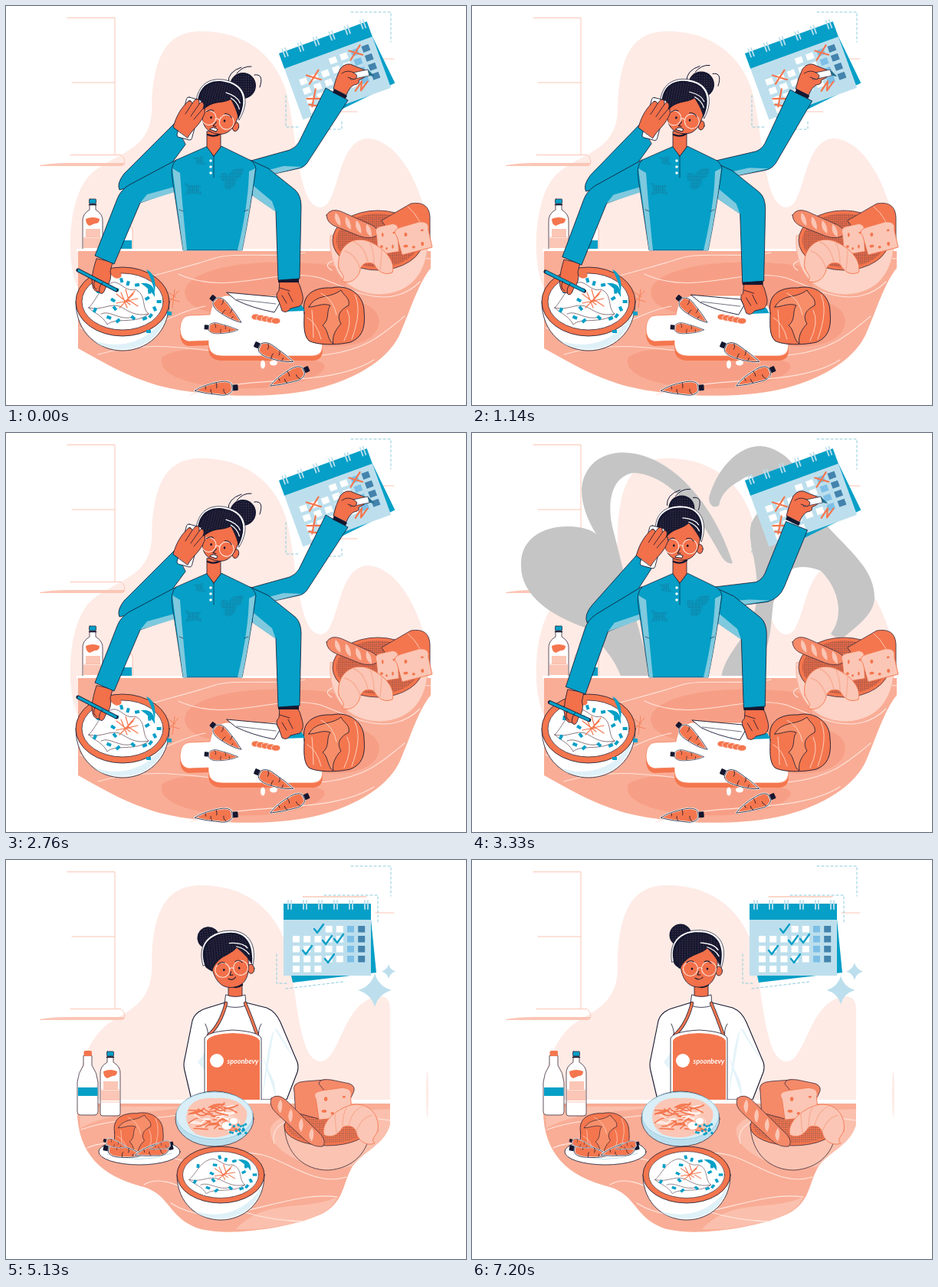
These frames come from a looping animation (600 px wide and 521 px high, 7.23 s). An HTML page:

```html
<!DOCTYPE html>
<html lang="en">
<head>
<meta charset="utf-8">
<title>Busy kitchen, calm kitchen</title>
<style>
html, body { margin: 0; width: 100%; height: 100%; overflow: hidden; background: #fff; }
svg { display: block; width: 100vw; height: 100vh; stroke-linecap: round; stroke-linejoin: round; }
</style>
</head>
<body>
<svg id="stage" viewBox="0 0 600 521"></svg>
<script>
const LOOP = 7230, SWAP = 3600, SWAY = 1377;
const TEAL = '#059fc7', SKY = '#7fc9de', PALE = '#bddfed', CORAL = '#f4764e', SKIN = '#f2704a',
  PEACH = '#f9ad96', ROSE = '#fbc6b5', BLUSH = '#feebe6', NAVY = '#15172f', WHITE = '#fff', LINE = '#3b2a3a';

const path = (d, fill = 'none', stroke = 'none', w = 1, extra = '') =>
  `<path d="${d}" fill="${fill}" stroke="${stroke}" stroke-width="${w}" ${extra}/>`;
const oval = (x, y, rx, ry, fill, stroke = 'none', w = 1) =>
  `<ellipse cx="${x}" cy="${y}" rx="${rx}" ry="${ry}" fill="${fill}" stroke="${stroke}" stroke-width="${w}"/>`;
const box = (x, y, w, h, fill, r = 0, stroke = 'none') =>
  `<rect x="${x}" y="${y}" width="${w}" height="${h}" rx="${r}" fill="${fill}" stroke="${stroke}" stroke-width=".8"/>`;
const group = (inner, transform = '', id = '') => `<g id="${id}" transform="${transform}">${inner}</g>`;
const repeat = (n, f) => Array.from({ length: n }, (_, i) => f(i)).join('');
const rand = i => { const v = Math.sin(i * 91.7 + 4.3) * 4375.85; return v - Math.floor(v); };

/* shared props */
function bottle(x, y, cap) {
  return group(
    path('M-4 7 L-4 14 Q-14 20 -13 30 L-13 81 Q-13 84 -10 84 H10 Q13 84 13 81 V30 Q14 20 4 14 V7Z', WHITE, LINE, .8) +
    path('M-9 26 Q0 22 9 26 Q9 32 3 32 L-4 35 Q-9 33 -9 26Z', CORAL) +
    box(-9, 39, 19, 11, ROSE) + box(-12, 51, 24, 13, ROSE) + path('M-12 50 H12 M-12 66 H12', 'none', PEACH, .7) +
    box(-4.5, 0, 9, 6, cap, 1, LINE) + path('M-4.5 7.5 H4.5', 'none', NAVY, 1.5), `translate(${x} ${y})`);
}

function carrot(x, y, angle, len) {
  const k = len / 45;
  return group(
    box(-5, -4, 8, 7, NAVY, 1) +
    path('M2 -4 Q6 -9 14 -8 L33 -4 L46 0 Q36 6 16 8 Q5 9 2 4Z', CORAL, WHITE, 2) +
    path('M2 -4 Q6 -9 14 -8 L33 -4 L46 0 Q36 6 16 8 Q5 9 2 4Z M10 -7 Q13 -4 12 -1 M20 7 Q19 3 20 1 M26 -5 Q28 -3 27 0 M33 4 L33 1', 'none', NAVY, .7),
    `translate(${x} ${y}) rotate(${angle}) scale(${k})`);
}

function soup(x, y, rx, ry, depth) {
  const bits = repeat(17, i => {
    const a = i * 2.4, r = .3 + .65 * Math.sqrt(rand(i));
    return group(box(-3, -2, 6, 4, TEAL), `translate(${46 * r * Math.cos(a) + 4} ${31 * r * Math.sin(a)}) rotate(${i * 53})`);
  });
  const inside = oval(0, 0, 53, 37, WHITE, LINE, .8) +
    path('M-44 8 C-34 -2 -30 -18 -16 -24 C-4 -30 2 -12 16 -16 C32 -10 24 8 34 16 C18 30 -10 20 -20 30 C-26 18 -36 16 -44 8Z', WHITE, '#59414c', .7) +
    path('M-44 8 C-26 12 -18 2 -4 6 C8 12 16 20 34 16 M-28 16 C-16 10 -4 26 14 20', 'none', '#59414c', .7) + bits +
    path('M-8 -10 L10 4 M-2 -12 L6 8 M16 -14 L2 2 M-8 2 L20 -4 M4 -16 L8 -2 L20 6 M-4 8 L6 -2 L14 -10', 'none', CORAL, 1.2) +
    path('M24 -24 Q43 -26 42 -6 Q38 -14 24 -24Z', TEAL);
  return group(
    path(`M${-rx} 0 C${-rx} ${depth * .65} ${-rx * .5} ${depth} 0 ${depth} C${rx * .5} ${depth} ${rx} ${depth * .65} ${rx} 0Z`, WHITE, NAVY, .8) +
    path(`M${rx * .96} 14 C${rx * .85} ${depth * .65} ${rx * .5} ${depth * .97} 0 ${depth * .97} C${-rx * .3} ${depth * .97} ${-rx * .5} ${depth * .9} ${-rx * .6} ${depth * .8} C0 ${depth} ${rx * .6} ${depth * .8} ${rx * .96} 14Z`, '#dff1f8') +
    oval(0, 0, rx, ry, CORAL, NAVY, .8) + group(inside, `scale(${rx / 61} ${ry / 45})`), `translate(${x} ${y})`);
}

const croissant = transform => group(
  path('M0 38 C-4 10 20 -8 45 6 C62 15 74 30 70 44 C60 48 52 44 46 33 C38 29 30 32 28 40 C26 52 14 60 4 55 C10 50 3 46 0 38Z', ROSE, CORAL, .9) +
  path('M8 16 Q22 20 28 39 M20 4 Q34 10 38 31 M40 4 Q46 14 46 33 M56 13 Q56 22 54 40', 'none', PEACH, 1.4), transform);

const slice = transform => group(
  path('M2 12 Q-4 2 10 0 L34 -4 Q48 -3 44 10 L46 36 L6 41Z', ROSE, CORAL, .9) +
  oval(14, 12, 2, 3, CORAL) + oval(12, 29, 3, 2, CORAL) + oval(22, 32, 2, 2, CORAL) + oval(34, 29, 2, 3, CORAL) + oval(36, 9, 2, 1.5, CORAL), transform);

const baguette = (transform, len) => group(
  path(`M0 0 Q2 -11 16 -11 L${len - 12} -8 Q${len} -6 ${len} 2 Q${len - 8} 11 ${len - 22} 11 L18 10 Q4 10 0 0Z`, '#f58a69', LINE, .7) +
  repeat(4, i => path(`M${10 + i * len / 5} -7 q9 3 12 14 q-11 -2 -12 -14`, ROSE)), transform);

const cabbage = transform => group(
  path('M2 34 C-2 10 14 0 38 1 C60 -4 80 10 80 32 C82 52 78 66 62 72 C46 76 18 76 8 70 C0 62 2 46 2 34Z', CORAL, NAVY, .9) +
  path('M8 26 C18 8 34 16 50 4 C54 12 62 14 60 24 C48 30 44 38 50 48 C42 56 38 66 40 74 C32 70 34 56 26 50 C36 42 30 32 36 24 C26 20 18 26 8 26Z', '#f78e69', NAVY, .8) +
  path('M6 40 Q18 46 24 68 M12 30 Q14 50 14 66 M68 10 Q78 30 64 68 M58 30 Q66 46 54 70 M24 8 Q40 16 44 36', 'none', '#ffd8cb', .9), transform);

const cells = repeat(35, i => {
  const c = i % 7, r = i / 7 | 0;
  if ((r === 0 && c < 3) || (r === 4 && c > 2)) return '';
  return box(12 + c * 14.2, 29 + r * 13, 9, 8.5, c === 5 ? '#7dbfe6' : c === 6 ? '#4383ad' : WHITE);
});
const calendar = (w, h, marks, transform) => group(
  path(`M10 ${h} L12 ${h + 9} L${w + 7} ${h - 4} L${w} 20Z`, TEAL) + box(0, 0, w, h, PALE) + box(0, 0, w, 21, TEAL) +
  group(cells, `scale(${w / 114} ${h / 94})`) +
  repeat(6, i => path(`M${6 + i * (w - 14) / 5} 7 v-11 m4 0 v11`, 'none', PALE, 1.8)) + marks, transform);

const cap = path('M-31 12 C-36 -28 -10 -33 1 -33 C26 -33 38 -12 29 20 Q16 -6 2 0 Z', WHITE, NAVY, .7);
const hair = path('M-29 10 C-34 -24 -10 -31 1 -30 C22 -31 34 -14 28 18 C24 10 20 2 12 -7 C2 4 -12 0 -21 22 C-25 18 -29 16 -29 10Z', NAVY) +
  path('M-27 8 C-30 -20 -10 -29 1 -28 C20 -29 30 -14 26 12 Q20 0 12 -8 C2 2 -12 -2 -21 20Z', 'url(#dots)') +
  path('M12 -9 Q22 -5 26 4 M4 -15 Q20 -14 25 -5', 'none', WHITE, 1.3);
const glasses = path('M-1 30 Q2 27 5 30', 'none', '#ffe4da', 1.1) +
  oval(-10, 30, 9.5, 9.5, 'none', '#ffe4da', 1.1) + oval(14, 30, 9.5, 9.5, 'none', '#ffe4da', 1.1);
const face = path('M-22 6 C-20 -18 20 -20 27 6 C28 34 21 48 3 48 C-18 48 -22 26 -22 6Z', SKIN, NAVY, .8);

/* backdrops */
const crown = 'C192 80 202 34 252 33 C305 32 348 58 365 110 C380 165 380 262 410 263';
const blobBusy = path(`M96 372 C78 345 78 256 108 222 C140 190 192 192 190 130 ${crown} C436 262 430 174 472 173 C516 175 552 250 554 320 V345Z`, BLUSH);
const blobCalm = path(`M97 345 C86 290 100 244 130 216 C162 194 193 188 190 130 ${crown} C438 262 438 180 490 178 Q501 180 501 195 V330Z`, BLUSH) + oval(549.5, 306, 1.5, 30, BLUSH);
const room = path('M80 15.5 H142 V194 M86 100 H142 M84 194.5 H150 Q157 200 154 207', 'none', '#fcc5b6', 1) +
  path('M44 208 Q60 205 80 205 H155 Q154 209 150 209 H44Z', '#fbc6b6') +
  path('M450 8 H502 V47', 'none', '#8bcbdc', 1, 'stroke-dasharray="3 3"') + path('M482 69 H506', 'none', '#fcc5b6', 1);

/* busy scene */
const marksBusy = path('M24 39 l16 12 m-16 0 l17 -13 M87 28 l15 11 m-17 1 l18 -14 M17 80 l12 -20 m-15 8 l17 6 M14 76 l14 8 M77 80 l12 -9 l-5 11 l12 -8', 'none', CORAL, 2.2);
const grain = 'M96 386 C150 360 225 345 270 330 C300 320 350 330 390 322 M225 350 C290 380 350 340 410 355 C450 370 500 400 540 360 M120 455 C220 425 300 470 420 455 C470 448 490 430 520 405 M240 508 C310 480 420 500 480 462 M96 420 C160 450 210 400 260 392 M425 345 C400 330 460 322 554 330';
const tableBusy = box(92, 317, 464, 4, WHITE) +
  path('M94 320 H554 V342 C537 364 528 396 514 428 C496 468 440 494 390 503 C340 512 260 511 200 496 C155 483 125 464 94 447Z', PEACH) +
  path('M236 364 C262 334 350 330 420 338 C460 345 425 375 470 390 C500 404 490 440 440 444 C360 450 330 400 280 402 C252 400 224 386 236 364Z M204 458 C250 432 300 470 390 462 C440 462 410 490 360 496 C300 506 190 494 204 458Z', '#f79f86') +
  path(grain, 'none', '#ffe3da', 1.1);

const board = 'M285 378 H366 Q380 380 386 392 L412 437 Q416 456 400 457 H282 Q265 457 264 442 V437 L238 438 Q227 436 227 421 Q228 404 240 404 L266 403 Q268 384 285 378Z';
const breadBusy = path('M423 300 C420 345 445 376 487 377 C530 376 552 345 550 302Z', '#fcd3c6', PEACH, .9) +
  group(oval(0, 0, 59, 39, CORAL, LINE, .8) + oval(0, 0, 54, 35, '#e76a46') + oval(0, 0, 54, 35, 'url(#specks)'), 'translate(485 306)') +
  path('M490 280 L528 258 Q552 254 553 276 V308 L520 322Z', CORAL, LINE, .8) + path('M524 262 Q542 276 547 305', 'none', ROSE, 1) +
  baguette('translate(418 273) rotate(20)', 72) + slice('translate(482 288) scale(.66 .9)') +
  slice('translate(506 290) rotate(-8) scale(1 .88)') + croissant('translate(434 304)');

const strands = path('M-19 -4 Q-20 -18 -2 -24 M-8 -16 Q0 -26 11 -25 M15 -14 Q28 -16 22 2', 'none', NAVY, 1);
const headBusy = group(
  oval(27, 33, 4, 6, SKIN, NAVY, .8) + group(cap, 'translate(0 6) scale(1 .88)') + face +
  group(hair, 'translate(0 6) scale(1 .88)') + glasses +
  path('M-15 23 q5 -5 9 -3 M9 20 q6 -2 10 3 M1 33 l-3 6 h4', 'none', NAVY, 1) +
  oval(-7, 29, 1.3, 1.6, NAVY) + oval(11, 29, 1.3, 1.6, NAVY) +
  path('M-5 44 Q-2 39 5 42 L4 45Z', WHITE, NAVY, .9), 'translate(270 118)');

const phoneHand = group(
  group(box(-10, -27, 20, 54, WHITE, 3, NAVY) + box(-7, -23, 4, 7, NAVY, 1.5), 'rotate(15)') +
  path('M-21 11 C-16 -6 -10 -14 -2 -22 Q2 -25 4 -20 L8 -25 Q14 -27 13 -19 L16 -22 Q21 -20 18 -13 L20 -13 Q22 -8 18 -2 C12 10 4 14 -2 25Z', SKIN, NAVY, .8) +
  path('M4 -20 L-5 -6 M13 -19 L2 -3 M18 -13 L6 1', 'none', NAVY, .8), 'translate(239 147)');
const writeHand = path('M427 108 Q430 94 436 82 Q444 72 454 78 L469 84 Q473 90 466 94 L460 97 Q462 102 454 103 Q448 106 444 116Z', SKIN, NAVY, .8) +
  path('M448 88 L472 83 L474 91 L450 96Z', WHITE, NAVY, .7) + path('M472 83 L481 92 L474 91Z', '#236f8d') +
  path('M438 88 Q446 82 455 88 Q461 92 454 96 L446 93', SKIN, NAVY, .8) + path('M428 108 L445 117 L443 121 L426 113Z', NAVY);
const stirArm = path('M118 330 Q113 345 112 357 Q112 374 121 373 Q126 380 130 368 Q139 358 136 346 L139 335Z', SKIN, NAVY, .8) +
  path('M94 345 L144 371', 'none', NAVY, 5) + path('M95 345.5 L143 370.5', 'none', TEAL, 3.6) +
  path('M116 358 Q112 367 118 370 M126 361 Q120 368 122 373', 'none', NAVY, .8) +
  path('M222 201 L160 234 Q149 241 145 252 L116 326 L141 337 L175 257 L220 241Z', TEAL, NAVY, .8) + path('M175 257 L184 246 L220 236 V243Z', SKY);
const cutArm = path('M288 374 L353 380 L357 388 L350 400 Q320 394 300 384Z', WHITE, NAVY, .9) + path('M301 383 L352 389', 'none', NAVY, .6) +
  path('M362 391 L386 391 L390 398 L364 399Z', TEAL) +
  path('M357 358 L356 372 Q350 376 356 386 L360 398 Q366 402 371 395 L383 392 Q390 386 386 374 Q384 364 379 357Z', SKIN, NAVY, .8) +
  path('M360 378 L366 388 M368 374 L374 386 M357 368 L370 372', 'none', NAVY, .8) + path('M355 355 H382 V361 H355Z', NAVY) +
  path('M318 201 L342 212 L377 240 Q385 247 385 262 L383 356 L355 358 L352 268 L320 246Z', TEAL, NAVY, .8) + path('M322 234 L347 255 L352 269 L322 248Z', SKY);
const patches = 'M244 198 l14 -2 l-2 6 l5 5 l-15 -1 l3 -4Z M233 231 l10 3 l12 -1 l-4 6 l5 7 l-11 -1 l-11 1 l3 -7Z M280 219 q7 -4 10 2 q6 -11 20 -9 q-1 12 -10 14 q2 8 -9 14 q-9 0 -6 -10 q-7 -3 -5 -11Z';
const torso = path('M263 183 L222 201 Q214 208 217 226 L231 319 H308 Q318 270 326 212 Q324 204 318 201 L281 183 L271 196Z', TEAL, NAVY, .7) +
  path('M217 212 L231 319 H236 Q230 260 227 218Z M325 212 Q318 270 308 319 H302 Q316 260 317 216Z', SKY) + path(patches, 'url(#specks)') +
  path('M262 164 L262 184 L271 196 L280 184 V164Z', SKIN, NAVY, .8) + path('M263 168 Q272 172 280 166', 'none', NAVY, 2.4) +
  path('M271 196 V224 M226 266 l5 2 M316 266 l-5 2', 'none', NAVY, .6) + repeat(3, i => oval(267, 202 + i * 8, 1.8, 1.8, WHITE));

const busy = blobBusy + room +
  path('M365 117 V158 H383 M409 161 H438 V150', 'none', '#8bcbdc', 1, 'stroke-dasharray="3 3"') + path('M436 138 H458', 'none', '#fcc5b6', 1);
const busyFront = box(134, 288, 31, 56, WHITE, 4, PEACH) + box(145, 306, 19, 11, TEAL) + bottle(113, 252, TEAL) +
  calendar(122, 92, marksBusy, 'translate(356 62) rotate(-20)') + tableBusy + breadBusy +
  path('M209 372 l12 8 m-10 8 l14 -16 m-8 22 l3 -24 m-8 12 l14 4', 'none', CORAL, .8) + soup(152, 386, 61, 45, 64) +
  path('M136 349 q5 -7 11 -2 q5 2 3 7 q-8 5 -14 -5Z', CORAL) + path('M183 344 Q197 350 194 374 Q190 356 183 344Z', TEAL) +
  box(183, 423, 6, 4, TEAL) + box(210, 399, 6, 5, TEAL) +
  path(board, CORAL, 'none', 1, 'transform="translate(0 6)"') + path(board, WHITE, CORAL, .7) +
  repeat(5, i => oval(326 + i * 6.5, 406 + i * 1.3, 6, 4, CORAL, WHITE, .7)) +
  carrot(271, 383, 40, 46) + carrot(263, 420, 4, 39) + carrot(329, 444, 24, 49) + carrot(297, 498, 175, 50) + carrot(390, 475, 155, 49) +
  oval(335, 468, 3, 5.5, WHITE) + oval(349, 466, 5, 3.5, WHITE) + cabbage('translate(387 367)') +
  path('', TEAL, NAVY, .8, 'id="writeArm"') + path('', SKY, 'none', 1, 'id="writeShade"') + group(writeHand, '', 'writeHand') +
  path('', TEAL, NAVY, .8, 'id="phoneArm"') + group(stirArm, '', 'stirArm') + group(cutArm, '', 'cutArm') + torso +
  group(oval(0, 0, 17, 17, NAVY) + oval(0, 0, 15, 15, 'url(#dots)') + strands, '', 'bunBusy') +
  group(headBusy, '', 'headBusy') + group(phoneHand, '', 'phoneHand');

/* calm scene */
const ticks = [[40, 33], [51, 48], [66, 46], [25, 61], [54, 72]].map(([x, y]) => path(`M${x} ${y} l4 5 l8 -11`, 'none', TEAL, 2.4)).join('');
const star = (r, id) => group(path(`M0 ${-r} Q${r * .22} ${-r * .22} ${r} 0 Q${r * .22} ${r * .22} 0 ${r} Q${-r * .22} ${r * .22} ${-r} 0 Q${-r * .22} ${-r * .22} 0 ${-r}Z`, PALE), '', id);
const calmBack = blobCalm + room +
  path('M415 46 H485 V84 M353 123 V161 H366 M365 168 L440 159', 'none', '#8bcbdc', 1, 'stroke-dasharray="3 3"') + path('M387 48 H470', 'none', PEACH, 1);
const tableCalm = path('M93 318 H501 V345 C494 372 466 380 452 400 C438 424 442 446 412 462 C372 480 296 492 254 482 C210 468 216 436 176 426 C124 412 90 382 93 318Z', PEACH) +
  path('M345 350 C360 320 430 330 501 325 V345 C494 372 466 380 452 400 C400 410 340 380 345 350Z M300 482 C340 440 390 460 432 440 Q425 460 385 472 Q340 484 300 482Z M97 350 C140 326 200 330 240 322 H95Z', '#fbc0ad') +
  path('M98 352 C160 330 220 345 250 322 M106 376 C160 350 230 420 300 385 C350 370 390 430 444 414 M215 448 C280 490 360 430 432 440 M180 424 C220 400 270 470 390 472 M350 370 C340 335 400 325 501 340', 'none', '#ffe7df', 1.1);
const headCalm = group(
  oval(-21, -20, 14.5, 14.5, NAVY) + oval(-21, -20, 13, 13, 'url(#dots)') +
  oval(29, 27, 4.5, 6, SKIN, NAVY, .8) + group(cap, 'translate(1 4) scale(1.08 .92)') + face +
  group(hair, 'translate(1 4) scale(1.08 .92)') + group(glasses, 'translate(2 -6)') +
  path('M-13 16 q5 -4 9 -1 M10 15 q5 -3 9 2 M3 27 l-2 5 h4 M-2 36 q6 4 10 -1', 'none', NAVY, 1) +
  oval(-6, 24, 1.3, 1.6, NAVY) + oval(14, 24, 1.3, 1.6, NAVY), 'translate(293 118)');
const straps = 'M264 229 Q280 215 287 187 M328 229 Q320 206 312 187';
const apron = path(straps, 'none', NAVY, 4.4) + path(straps, 'none', CORAL, 3) +
  path('M259 313 V233 Q262 224 296 222 Q330 224 333 233 V313Z', WHITE, NAVY, .8) + path('M262 313 V236 Q266 227 296 226 Q327 227 331 236 V313Z', CORAL) +
  oval(275, 262, 9, 9, WHITE) +
  '<text x="288.5" y="265.5" fill="#fff" font-family="Lato, sans-serif" font-size="9" font-weight="700" font-style="italic">spoonbevy</text>';
const pasta = oval(272, 338, 51, 36, PALE, LINE, .8) + oval(272, 334, 50, 31, '#d9eef6', '#8ec7dc', .8) +
  path('M239 322 Q250 309 272 311 Q304 309 314 328 Q317 342 300 354 Q276 368 248 358 Q228 344 239 322Z', ROSE) +
  repeat(44, i => {
    const x = 238 + rand(i) * 50, y = 318 + rand(i + 60) * 36;
    return path(`M${x} ${y} q${4 + rand(i + 7) * 10} ${-10 + rand(i + 9) * 20} 18 ${-7 + rand(i + 3) * 14}`, 'none', i % 3 ? CORAL : '#fff0ea', 1.6);
  }) + oval(288, 347, 7, 5.5, WHITE, PEACH) + oval(297, 341, 6, 5, WHITE, PEACH) +
  repeat(16, i => oval(292 + rand(i) * 21, 345 + rand(i + 20) * 13, 1.7, 1.7, TEAL));
const roast = oval(174, 381, 53, 17, WHITE, NAVY, .8) + path('M132 384 Q174 398 216 383', 'none', PALE, 1) +
  cabbage('translate(140 330) scale(.81 .76)') + carrot(132, 377, 10, 47) + carrot(213, 375, 167, 45) + carrot(130, 367, 16, 28) + carrot(215, 370, 165, 28);
const breadCalm = path('M363 345 C364 385 390 405 420 405 C452 403 474 382 475 350Z', '#fbc4b2', LINE, .8) +
  oval(419, 348, 56, 25, CORAL, LINE, .8) + oval(419, 348, 52, 22, 'url(#specks)') +
  path('M376 303 Q372 290 390 289 L416 287 L440 300 L408 338 L378 330Z', '#f58a69', LINE, .8) +
  path('M408 292 Q408 285 424 287 L448 292 Q458 296 452 306 L440 330Z', '#f58a69', LINE, .8) + slice('translate(402 301) scale(1.08 .93)') +
  baguette('translate(346 311) rotate(42)', 92) + croissant('translate(485 318) scale(-1 .94)');
const glassBottle = path('M101 256 V268 Q94 278 93 290 V328 Q93 333 98 333 H115 Q120 333 120 328 V290 Q119 278 112 268 V256Z', WHITE, LINE, .8) +
  box(94, 297, 25.5, 11, TEAL) + box(101.5, 249, 10.5, 7, CORAL, 2);
const calmFront = calendar(114, 94, ticks, 'translate(362 57)') +
  group(star(20, 'bigStar'), 'translate(481 170)') + group(star(10, 'smallStar'), 'translate(499 145.5)') + tableCalm +
  path('', WHITE, NAVY, 1.1, 'id="shirt"') + path('', '#e3f3f9', 'none', 1, 'id="shirtShade"') +
  path('M260 214 Q265 225 263 232 M333 214 Q328 222 330 232', 'none', NAVY, .8) +
  path('M290 160 V180 Q299 186 308 180 V160Z', SKIN, NAVY, .8) + path('M291 163 Q300 169 308 163', 'none', NAVY, 2.4) +
  path('M287 176 Q299 181 312 176 L313 190 Q299 195 285 190Z', WHITE, NAVY, .8) +
  apron + group(headCalm, '', 'headCalm') + box(93, 313, 409, 5, WHITE) +
  glassBottle + bottle(136, 250, TEAL) + roast + pasta + breadCalm + soup(280, 411, 57, 37, 59);

/* grey brush shape, uncovered along a looping line */
const brush = 'M64 170 C64 140 90 122 125 122 C145 122 158 128 162 132 C145 105 136 72 150 50 C165 24 200 20 230 32 C282 52 322 112 340 170 C330 172 326 162 318 148 C290 98 255 55 212 52 C182 55 174 92 185 130 L205 210 L235 320 H195 C185 290 162 270 150 255 C100 238 62 210 64 170Z ' +
  'M309 85 C318 50 345 17 376 17 C410 20 430 50 440 80 C450 130 525 160 525 215 C525 235 505 250 487 265 Q475 270 468 262 C485 240 480 205 455 180 Q430 170 412 180 Q400 200 393 222 C388 262 392 292 352 320 H325 C330 280 375 260 372 200 C370 150 352 130 372 105 C385 70 372 45 350 62 Q325 75 322 95 Q310 100 309 85Z';
const route = 'M340 168 C300 85 240 30 195 38 C150 48 155 110 178 165 C190 210 215 270 200 305 C160 260 75 225 92 165 C108 125 160 140 185 180 C240 290 320 330 345 285 C410 190 420 130 385 75 C360 25 330 70 325 80 C370 15 420 60 440 130 C470 175 525 190 490 250';
const dots = (id, gap, color) => `<pattern id="${id}" width="${gap}" height="${gap}" patternUnits="userSpaceOnUse"><circle cx="1" cy="1" r=".55" fill="${color}"/></pattern>`;

document.getElementById('stage').innerHTML =
  `<defs>${dots('dots', 3.2, '#6b5568')}${dots('specks', 2.6, '#2b3a55')}<clipPath id="wipe"><rect id="wipeBox" width="600" height="521"/></clipPath>` +
  `<mask id="reveal" maskUnits="userSpaceOnUse" x="0" y="0" width="600" height="521">${path(route, 'none', WHITE, 130, 'id="route" pathLength="1" stroke-dasharray="1 2"')}</mask></defs>` +
  group(busy, '', 'busyBack') + group(calmBack, '', 'calmBack') +
  `<g clip-path="url(#wipe)"><g mask="url(#reveal)">${path(brush, '#c5c5c5', '#c5c5c5', 0, 'id="brush"')}</g></g>` +
  group(busyFront, '', 'busyFront') + group(calmFront, '', 'calmFront');

/* motion */
const el = {};
document.querySelectorAll('[id]').forEach(n => { if (n.id) el[n.id] = n; });
const set = (id, name, value) => el[id].setAttribute(name, value);
const move = (id, value) => set(id, 'transform', value);
const mix = (a, b, k) => a + (b - a) * k;
const ramp = (t, a, b) => Math.min(1, Math.max(0, (t - a) / (b - a)));
const ease = k => k * k * (3 - 2 * k);
const swing = (t, period) => (1 - Math.cos(2 * Math.PI * t / period)) / 2;
const morph = (a, b, k) => {
  const to = b.match(/[\d.]+/g);
  let i = 0;
  return a.replace(/[\d.]+/g, v => mix(+v, +to[i++], k).toFixed(2));
};

function drawBusy(t) {
  const q = swing(t, SWAY), chop = swing(t, SWAY / 2);
  set('writeArm', 'd', morph(
    'M316 203 L370 188 Q378 185 382 178 L417 107 L446 123 L396 200 Q390 211 382 212 L346 220 L316 214Z',
    'M316 201 L371 195 Q378 192 382 184 L409 116 L437 127 L408 201 Q402 216 386 221 L346 226 L316 214Z', q));
  set('writeShade', 'd', morph('M332 217 L362 209 L386 210 L346 220Z', 'M332 220 L362 218 L389 219 L346 226Z', q));
  move('writeHand', `translate(${-18 * q} 0)`);
  set('phoneArm', 'd', morph(
    'M220 153 L154 219 Q144 232 148 240 L165 236 L214 208 L234 181Z',
    'M216 158 L157 225 Q146 238 150 248 L165 240 L214 208 L234 177Z', q));
  move('phoneHand', `translate(${-4 * q} ${2 * q})`);
  move('stirArm', `rotate(${-3.4 * q} 217 215)`);
  move('cutArm', `translate(${-3 * chop} ${4 * chop})`);
  move('bunBusy', `translate(${mix(309, 271, q)} ${mix(104, 98, q)})`);
  move('headBusy', `rotate(${14 * (1 - q)} 271 165)`);
}

function drawCalm(t) {
  const q = t < 4440 ? 0 : swing(t - 4440, 1380), arms = ease(ramp(t, 4080, 4440));
  set('shirt', 'd', morph(
    'M286 186 L260 194 Q248 199 243 210 L220 256 Q215 264 219 273 L240 313 H352 L389 275 Q394 268 390 261 L358 212 Q352 198 340 193 L312 186Z',
    'M286 186 L260 194 Q246 199 243 210 L233 260 Q231 267 233 275 L242 313 H366 L380 277 Q382 270 380 264 L358 212 Q352 198 340 193 L312 186Z', arms));
  set('shirtShade', 'd', morph(
    'M260 240 L244 270 L260 306 V240Z M334 255 L346 270 L334 302Z M345 200 Q358 225 388 262 L362 240 Q350 220 345 200Z',
    'M260 250 L250 264 L260 276 V250Z M334 255 L350 290 L353 313 L334 313Z M345 200 Q356 225 379 264 L362 240 Q350 220 345 200Z', arms));
  move('headCalm', `rotate(${-7 * q} 298 165)`);
  move('bigStar', `scale(${mix(.92, 1.1, q)})`);
  move('smallStar', `scale(${mix(1.12, .92, q)})`);
}

function draw(t) {
  const calm = t >= SWAP;
  for (const part of ['Back', 'Front']) {
    set('busy' + part, 'display', calm ? 'none' : 'inline');
    set('calm' + part, 'display', calm ? 'inline' : 'none');
  }
  const grey = t > 3015 && t < 4020;
  set('brush', 'display', grey ? 'inline' : 'none');
  if (grey) {
    const grow = ease(ramp(t, 3340, 3620));
    set('route', 'stroke-dashoffset', 1 - ramp(t, 3000, 3320));
    set('route', 'stroke-width', mix(130, 900, grow));
    set('brush', 'stroke-width', 500 * grow);
    set('wipeBox', 'y', 521 * ramp(t, 3640, 4020));
  }
  calm ? drawCalm(t) : drawBusy(t);
}

const start = performance.now();
function tick() {
  draw((performance.now() - start) % LOOP);
  requestAnimationFrame(tick);
}
tick();
</script>
</body>
</html>
```
